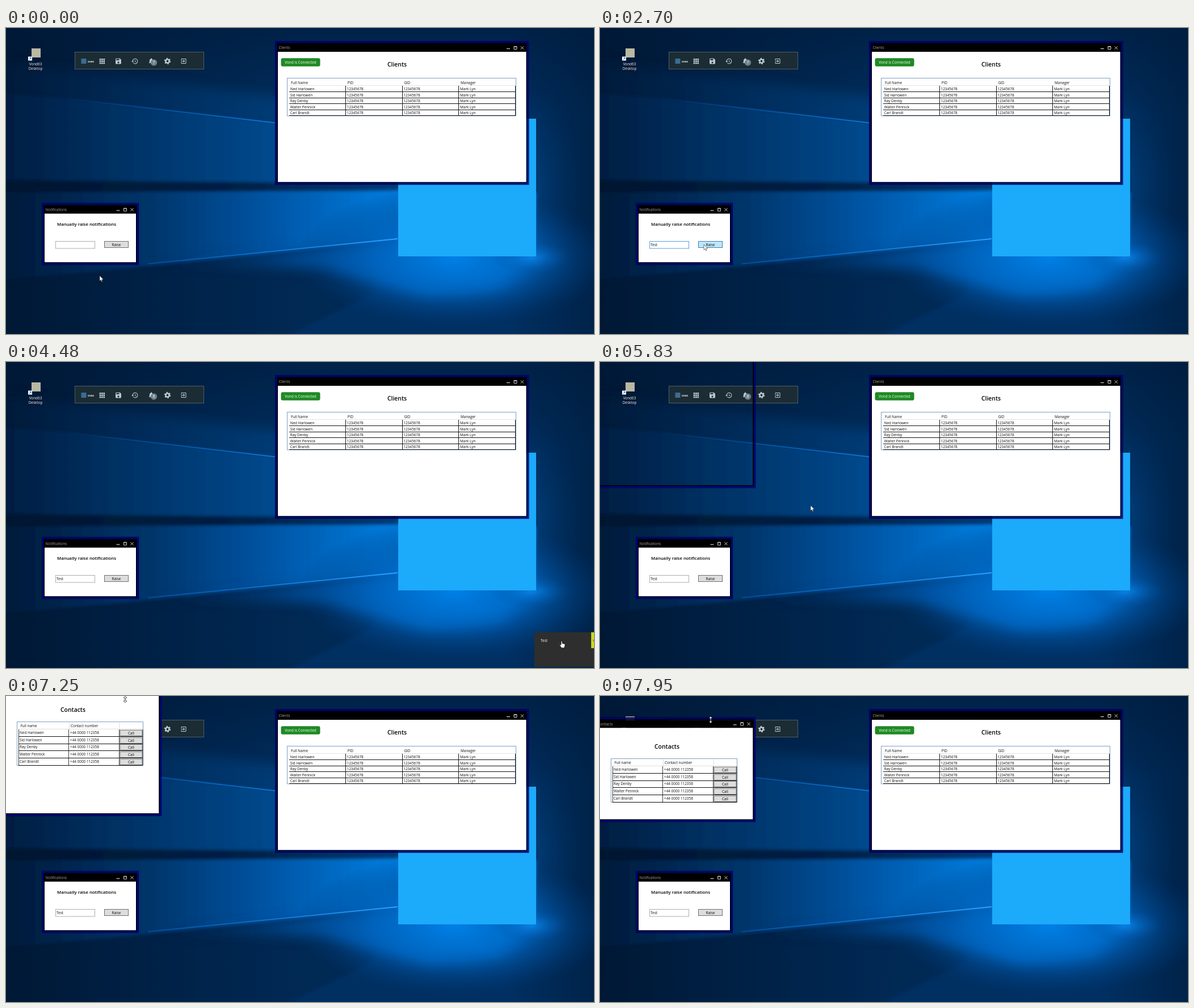
Write an HTML page that moves like this. It is 1036 px wide and 540 px high and loops after 8000 ms.

```html
<!DOCTYPE html>
<html lang="en">
<head>
<meta charset="utf-8">
<title>Desktop notifications</title>
<style>
html, body { margin: 0; width: 100%; height: 100%; overflow: hidden; background: #001a3a; }
svg { display: block; width: 100vw; height: 100vh; }
text { font: 6.4px "Open Sans", "Noto Sans", sans-serif; fill: #111; }
text.h { font-size: 10.4px; font-weight: 600; fill: #000; text-anchor: middle; }
text.sub { font-size: 7.8px; font-weight: 600; fill: #000; }
text.mid { text-anchor: middle; }
text.white { fill: #fff; }
text.bar { fill: #a2a2a2; }
</style>
</head>
<body>
<svg viewBox="0 0 1036 540" preserveAspectRatio="none">
  <defs>
    <linearGradient id="base">
      <stop offset="0" stop-color="#001631"/><stop offset=".25" stop-color="#00244c"/>
      <stop offset=".5" stop-color="#003061"/><stop offset=".85" stop-color="#003063"/>
      <stop offset="1" stop-color="#002349"/>
    </linearGradient>
    <linearGradient id="upper" gradientUnits="userSpaceOnUse" x1="0" y1="0" x2="690" y2="0">
      <stop offset="0" stop-color="#001e42"/><stop offset=".3" stop-color="#003265"/>
      <stop offset=".65" stop-color="#004789"/><stop offset="1" stop-color="#0060b4"/>
    </linearGradient>
    <linearGradient id="lower" gradientUnits="userSpaceOnUse" x1="0" y1="0" x2="934" y2="0">
      <stop offset="0" stop-color="#001a3a"/><stop offset=".28" stop-color="#00366c"/>
      <stop offset=".5" stop-color="#0055a5"/><stop offset=".7" stop-color="#0077d6"/>
      <stop offset="1" stop-color="#0084e6"/>
    </linearGradient>
    <linearGradient id="gap" gradientUnits="userSpaceOnUse" x1="0" y1="0" x2="690" y2="0">
      <stop offset="0" stop-color="#00152f"/><stop offset=".6" stop-color="#002046"/>
      <stop offset="1" stop-color="#003c78"/>
    </linearGradient>
    <linearGradient id="ray" gradientUnits="userSpaceOnUse" x1="100" y1="0" x2="690" y2="0">
      <stop offset="0" stop-color="#0a6fd0" stop-opacity="0"/><stop offset=".5" stop-color="#0a6fd0" stop-opacity=".8"/>
      <stop offset="1" stop-color="#2ba4ff"/>
    </linearGradient>
    <linearGradient id="spill" gradientUnits="userSpaceOnUse" x1="250" y1="0" x2="934" y2="0">
      <stop offset="0" stop-color="#002c5c" stop-opacity="0"/><stop offset=".5" stop-color="#0058ac"/>
      <stop offset="1" stop-color="#0088f0"/>
    </linearGradient>
    <linearGradient id="sky" x1="0" y1="0" x2="0" y2="1">
      <stop offset="0" stop-color="#001a3a" stop-opacity=".65"/><stop offset="1" stop-color="#001a3a" stop-opacity="0"/>
    </linearGradient>
    <radialGradient id="floor">
      <stop offset="0" stop-color="#0080e6"/><stop offset=".5" stop-color="#0064be" stop-opacity=".8"/>
      <stop offset="1" stop-color="#003a78" stop-opacity="0"/>
    </radialGradient>
    <radialGradient id="halo">
      <stop offset="0" stop-color="#0a8af0" stop-opacity=".8"/><stop offset="1" stop-color="#0050a0" stop-opacity="0"/>
    </radialGradient>
    <filter id="soft" x="-10%" y="-20%" width="120%" height="140%"><feGaussianBlur stdDeviation="2.5"/></filter>
    <filter id="wide" x="-20%" y="-50%" width="140%" height="200%"><feGaussianBlur stdDeviation="10"/></filter>
  </defs>

  <rect width="1036" height="540" fill="url(#base)"/>
  <rect width="1036" height="150" fill="url(#sky)"/>
  <path d="M-40 55L480 122 700 160V200L-40 120Z" fill="url(#upper)" opacity=".5" filter="url(#wide)"/>
  <g filter="url(#soft)">
    <path d="M-10 114L110 124 475 167 700 196V274L-10 268Z" fill="url(#upper)"/>
    <path d="M-10 448L300 415 690 374 640 470 480 550H-10Z" fill="#00193a" opacity=".35"/>
    <path d="M-10 290L690 287 934 290V404L690 374 250 420 -10 445Z" fill="url(#lower)"/>
    <path d="M-10 270L700 276V287L-10 290Z" fill="url(#gap)"/>
  </g>
  <path d="M250 418L690 372 934 402 870 455 740 470 560 425Z" fill="url(#spill)" filter="url(#wide)"/>
  <ellipse cx="790" cy="405" rx="280" ry="125" fill="url(#floor)"/>
  <ellipse cx="900" cy="280" rx="120" ry="180" fill="url(#halo)" opacity=".35"/>
  <ellipse cx="925" cy="405" rx="70" ry="30" fill="url(#halo)"/>
  <path d="M110 125L480 168M250 416L690 372" stroke="url(#ray)" stroke-width="2" fill="none"/>
  <rect x="691" y="160" width="243" height="243" fill="#1caafb"/>

  <g id="desk"></g>
  <g id="contacts"></g>
  <g id="toast">
    <rect x="931" y="477" width="106" height="61" fill="#2e2e2e"/>
    <text id="toastText" class="white" x="942" y="493.5">Test</text>
    <g id="tab"><path d="M1031 477h5v28h-5z" fill="#ccd71c"/><path d="M1034 490l1.6 1.5-1.6 1.5" stroke="#333" stroke-width=".8" fill="none"/></g>
  </g>
  <g id="cursor"></g>
</svg>
<script>
const LOOP = 8000;
const $ = id => document.getElementById(id);
const people = ["Ned Harlowen", "Sid Harlowen", "Ray Denby", "Walter Pennick", "Carl Brandt"];
const manager = "Mark Lyn", phone = "+44 0000 112358";

const rect = (x, y, w, h, fill, extra = "") =>
  `<rect x="${x}" y="${y}" width="${w}" height="${h}" fill="${fill}" ${extra}/>`;
const text = (x, y, s, cls = "", extra = "") => `<text x="${x}" y="${y}" class="${cls}" ${extra}>${s}</text>`;
const path = (d, stroke, width = 1) => `<path d="${d}" fill="none" stroke="${stroke}" stroke-width="${width}"/>`;

// all windows are placed by their white client area
const TITLE = 14;
const ring = (x, y, r, b, grow, color, width) =>
  rect(x - grow, y - TITLE - grow, r - x + 2 * grow, b - y + TITLE + 2 * grow, "none", `stroke="${color}" stroke-width="${width}"`);
const frame = (x, y, r, b) =>
  ring(x, y, r, b, 1, "#000", 2) + ring(x, y, r, b, 3, "#000092", 2) + ring(x, y, r, b, 4.5, "#00004c", 1);

function win(x, y, r, b, title) {
  const c = y - 7;
  return frame(x, y, r, b) +
    rect(x, y - TITLE, r - x, TITLE, "#000") + rect(x, y, r - x, b - y, "#fff") +
    text(x + 1.5, c + 2.4, title, "bar") +
    path(`M${r - 34.5} ${c + 1.5}h6`, "#ccc", 1.2) +
    path(`M${r - 21.5} ${c - 2.5}h5v5h-5zM${r - 21.5} ${c - 1.8}h5`, "#ccc") +
    path(`M${r - 9.7} ${c - 2.7}l5.4 5.4m0 -5.4l-5.4 5.4`, "#ccc");
}

function button(x, y, w, h, label, fill = "#ddd", edge = "#707070") {
  return rect(x + .5, y + .5, w - 1, h - 1, fill, `stroke="${edge}"`) +
    text(x + w / 2, y + h / 2 + 2.5, label, "mid");
}

function icon(x, y, d, size = 12) {
  return `<path transform="translate(${x - size / 2} ${y - size / 2}) scale(${size / 24})" fill="#c3ced2" fill-rule="evenodd" d="${d}"/>`;
}

function toolbar(count) {
  let s = rect(121.5, 42.5, 227, 30, "#1b2c35", 'stroke="#4d6062"');
  s += rect(132.5, 54, 9, 9, "#3c6c92") +
    text(144, 60.5, "OVEK", "white", 'style="font-size:4.1px;font-weight:700"');
  for (let i = 0; i < 9; i++) s += rect(164.7 + i % 3 * 3.4, 54 + (i / 3 | 0) * 3.4, 2.6, 2.6, "#c3ced2");
  s += icon(198, 58.6, "M17 3H5a2 2 0 0 0-2 2v14a2 2 0 0 0 2 2h14a2 2 0 0 0 2-2V7zM12 19a3 3 0 1 1 0-6 3 3 0 0 1 0 6zM15 9H5V5h10z", 13);
  s += icon(227, 58.6, "M13 3a9 9 0 0 0-9 9H1l4 4 4-4H6a7 7 0 1 1 2 5l-1.4 1.4A9 9 0 1 0 13 3zM12 8v5l4.3 2.5.7-1.2-3.5-2.1V8z", 13);
  s += icon(256, 58.2, "M12 22a2 2 0 0 0 2-2h-4a2 2 0 0 0 2 2zM18 16v-5c0-3-1.6-5.6-4.5-6.3V4a1.5 1.5 0 0 0-3 0v.7C7.6 5.4 6 8 6 11v5l-2 2v1h16v-1z", 12.5);
  s += `<circle cx="260.5" cy="61" r="5.6" fill="#71828e"/>` + text(260.5, 63.3, count, "mid white");
  s += `<circle cx="284.5" cy="58.5" r="3.1" fill="none" stroke="#c3ced2" stroke-width="2.4"/>` +
    `<circle cx="284.5" cy="58.5" r="4.8" fill="none" stroke="#c3ced2" stroke-width="1.8" stroke-dasharray="2.4 2.63"/>`;
  s += icon(313, 58.5, "M10.1 15.6L11.5 17l5-5-5-5-1.4 1.4L12.7 11H3v2h9.7zM19 3H5a2 2 0 0 0-2 2v4h2V5h14v14H5v-4H3v4a2 2 0 0 0 2 2h14a2 2 0 0 0 2-2V5a2 2 0 0 0-2-2z");
  return s;
}

function shortcut() {
  const shade = 'style="text-shadow:0 1px 1px #000"';
  return rect(45, 36, 16, 16, "#b9b8a2") + rect(39, 50.5, 7, 7, "#fff") +
    path("M40.8 56l3.2-3.4m-2.4 0h2.4v2.4", "#1c6fc0") +
    text(52, 66, "Vond63", "mid white", shade) + text(52, 74, "Desktop", "mid white", shade);
}

function clients() {
  const row = j => Math.round(112 + j * 10.5) + .5;
  let s = win(479, 42, 916.5, 271.7, "Clients");
  s += rect(484.5, 53.3, 69, 14.4, "#1f8a24", 'rx="3"') + text(519, 62.9, "Vond is Connected", "mid white");
  s += text(689, 68, "Clients", "h") + rect(495.5, 88.5, 403, 66.5, "#fff", 'stroke="#7fa0bf"');
  ["Full Name", "PID", "GID", "Manager"].forEach((h, i) => {
    s += text(502 + i * 99.7, 98.6, h);
    s += path(`M${Math.floor(598.7 + i * 99.6) + .5} 102V155`, "#111");
    people.forEach((name, j) => s += text(500.7 + i * 99.8, 110 + j * 10.5, [name, "12345678", "12345678", manager][i]));
  });
  s += path("M498 101.5H897", "#e2e2e2");
  people.forEach((_, j) => s += path(`M499 ${row(j)}H898`, "#111"));
  return s;
}

function notifier(typed, focused, mode, caret) {
  const look = { hover: ["#bee6fd", "#3c7fb1"], down: ["#c4e5f6", "#2c628b"] }[mode] || [];
  return win(68, 327.6, 229, 413.3, "Notifications") +
    text(90, 349, "Manually raise notifications", "sub") +
    rect(87.5, 376.5, 69, 12.5, "#fff", `stroke="${focused ? "#569de5" : "#abadb3"}"`) +
    text(89, 385, typed) +
    (caret ? path(`M${89.5 + typed.length * 3.3} 377.5v9`, "#000", .8) : "") +
    button(173, 376, 43, 12, "Raise", ...look);
}

function contactList(top, bottom) {
  let s = win(-5, top, 269.2, bottom, "Contacts");
  const y = top + 53.8, line = j => Math.round(y + 25.8 + j * 12.7) + .5;
  s += text(118, top + 36.6, "Contacts", "h") + rect(19.5, y + .5, 222, 77, "#fff", 'stroke="#7fa0bf"');
  s += text(25.5, y + 10, "Full name") + text(114, y + 10, "Contact number");
  s += path(`M111.5 ${y + 2}v11M200 ${y + 2}v11M21 ${y + 13.2}h220`, "#dcdcdc");
  people.forEach((name, j) => {
    s += text(24, line(j) - 4.4, name) + text(113, line(j) - 4.4, phone) +
      path(`M22 ${line(j)}H241`, "#111") + button(200.5, line(j) - 11.7, 40, 11.2, "Call");
  });
  return s + path(`M110.5 ${y + 14}v63M199.5 ${y + 14}v63M241 ${y + 14}v63M22.5 ${y + 14}v63`, "#222", .9);
}

const shapes = {
  arrow: '<path d="M0 0V9.6L2.2 7.6 3.6 11 5.1 10.4 3.7 7.1H6.7Z" fill="#fff" stroke="#000" stroke-width=".5"/>',
  beam: path("M-2 -5h1.5l.5 .5 .5-.5h1.5M0 -4.5v9M-2 5h1.5l.5-.5 .5 .5h1.5", "#000", .8),
  hand: '<path d="M-1 1.2q1-1.4 2 0V4.6l4 .8q1.2.3 1 1.6l-.7 3.4-1 2H-.2L-3.6 7.6q.4-1.6 2.6 0Z" fill="#fff" stroke="#000" stroke-width=".6"/>',
  resize: '<path d="M0 -6L3 -2.8H.8V2.8H3L0 6-3 2.8H-.8V-2.8H-3Z" fill="#fff" stroke="#000" stroke-width=".6"/>'
};

// pointer legs: first step, last step, number of steps, destination
const legs = [
  [120, 600, 4, 128, 382], [2060, 2580, 5, 168, 377], [2700, 2700, 1, 183, 382],
  [3400, 4360, 8, 979, 492], [5440, 5830, 4, 371, 253], [5960, 5960, 1, 358, 228],
  [6100, 6380, 3, 210, 2], [7250, 7250, 1, 210, 6], [7390, 7950, 5, 195, 42]
];

function steps(t, t0, t1, n) {
  if (t < t0) return 0;
  if (t >= t1) return 1;
  return (Math.floor((t - t0) / (t1 - t0) * (n - 1) + 1e-6) + 1) / n;
}

function pointer(t) {
  let x = 165, y = 437;
  for (const [t0, t1, n, px, py] of legs) {
    const k = steps(t, t0, t1, n), p = k * k * (3 - 2 * k);
    x += (px - x) * p;
    y += (py - y) * p;
    if (k < 1) break;
  }
  return [x, y];
}

const during = (t, a, b) => t >= a && t < b;
const drawn = {};
function paint(id, fn, ...args) {
  const key = args.join();
  if (drawn[id] === key) return;
  drawn[id] = key;
  $(id).innerHTML = fn(...args);
}

function draw(t) {
  const [x, y] = pointer(t);
  const typed = "Test".slice(0, t < 1560 ? 0 : Math.floor((t - 1560) / 125) + 1);
  const mode = during(t, 2820, 2980) ? "down" : during(t, 2700, 3400) ? "hover" : "";
  const caret = during(t, 760, 1130) || during(t, 1560, 2060);
  paint("toolbar", toolbar, t < 3120 ? 7 : 8);
  paint("notifier", notifier, typed, during(t, 760, 2980) ? 1 : "", mode, caret ? 1 : "");

  const k = steps(t, 7390, 7950, 5);
  const top = t < 7250 ? -12.7 : -8.7 + 65 * k;
  const bottom = during(t, 7250, 7390) ? 207 : 217.5;
  const stage = t < 5830 ? 0 : t < 5960 ? 1 : 2;
  paint("contacts", (s, a, b) => s === 2 ? contactList(a, b) : s ? frame(-5, a, 269.2, b) : "", stage, top, bottom);

  $("toast").style.display = during(t, 3400, 5040) ? "" : "none";
  $("toast").setAttribute("transform", `translate(${t < 3540 ? 50 : 0} 0)`);
  $("toastText").style.opacity = t < 4760 ? 1 : .7;
  $("tab").style.display = during(t, 4220, 4760) ? "" : "none";

  const inBox = x > 87 && x < 157 && y > 376 && y < 390;
  paint("cursor", name => shapes[name],
    t >= 6380 ? "resize" : during(t, 4480, 5040) ? "hand" : inBox ? "beam" : "arrow");
  $("cursor").setAttribute("transform", `translate(${x} ${y})`);
}

$("desk").innerHTML = shortcut() + '<g id="toolbar"></g>' + clients() + '<g id="notifier"></g>';
const start = performance.now();
function tick() {
  draw((performance.now() - start) % LOOP);
  requestAnimationFrame(tick);
}
tick();
</script>
</body>
</html>
```
